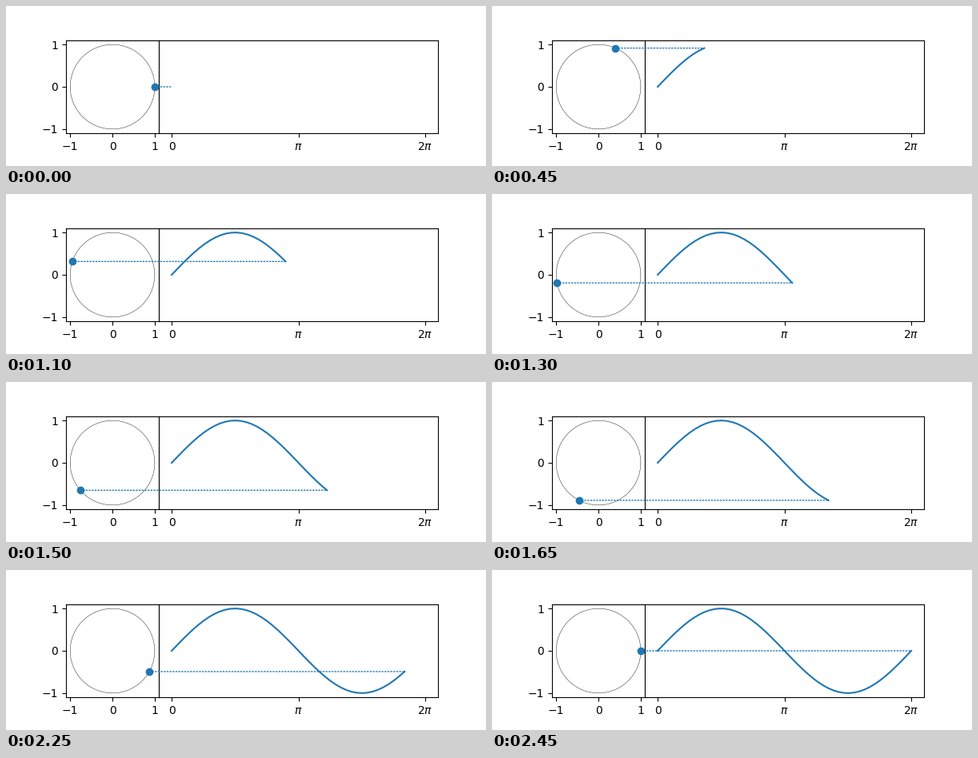
A matplotlib script for the animation above (2.5 s loop, 600x200 px).

```python
import matplotlib.pyplot as plt
import numpy as np
from matplotlib.animation import FuncAnimation
from matplotlib.patches import ConnectionPatch

STEPS = 50
angles = np.linspace(0, 2 * np.pi, STEPS)

fig, (circle_ax, wave_ax) = plt.subplots(
    ncols=2,
    sharey=True,
    figsize=(6, 2),
    dpi=100,
    gridspec_kw=dict(width_ratios=[1, 3], wspace=0),
)
circle_ax.set_aspect(1)
wave_ax.set_box_aspect(1 / 3)
wave_ax.yaxis.set_visible(False)
wave_ax.set_xticks([0, np.pi, 2 * np.pi], ["0", r"$\pi$", r"$2\pi$"])

circle_ax.plot(np.cos(angles), np.sin(angles), "k", lw=0.3)
point, = circle_ax.plot([0], [0], "o", color="C0")

# The full curve fixes the view limits before the animation starts.
wave, = wave_ax.plot(angles, np.sin(angles), color="C0")

link = ConnectionPatch(
    (1, 0), (0, 0), "data", "data",
    axesA=circle_ax, axesB=wave_ax, color="C0", ls="dotted",
)
fig.add_artist(link)


def animate(angle):
    x, y = np.cos(angle), np.sin(angle)
    point.set_data([x], [y])
    trail = np.linspace(0, angle, int(angle * 25 / np.pi))
    wave.set_data(trail, np.sin(trail))
    link.xy1 = x, y
    link.xy2 = angle, y
    return point, wave, link


anim = FuncAnimation(fig, animate, frames=angles, interval=50,
                     repeat=True, repeat_delay=0, blit=False)
plt.show()
```
